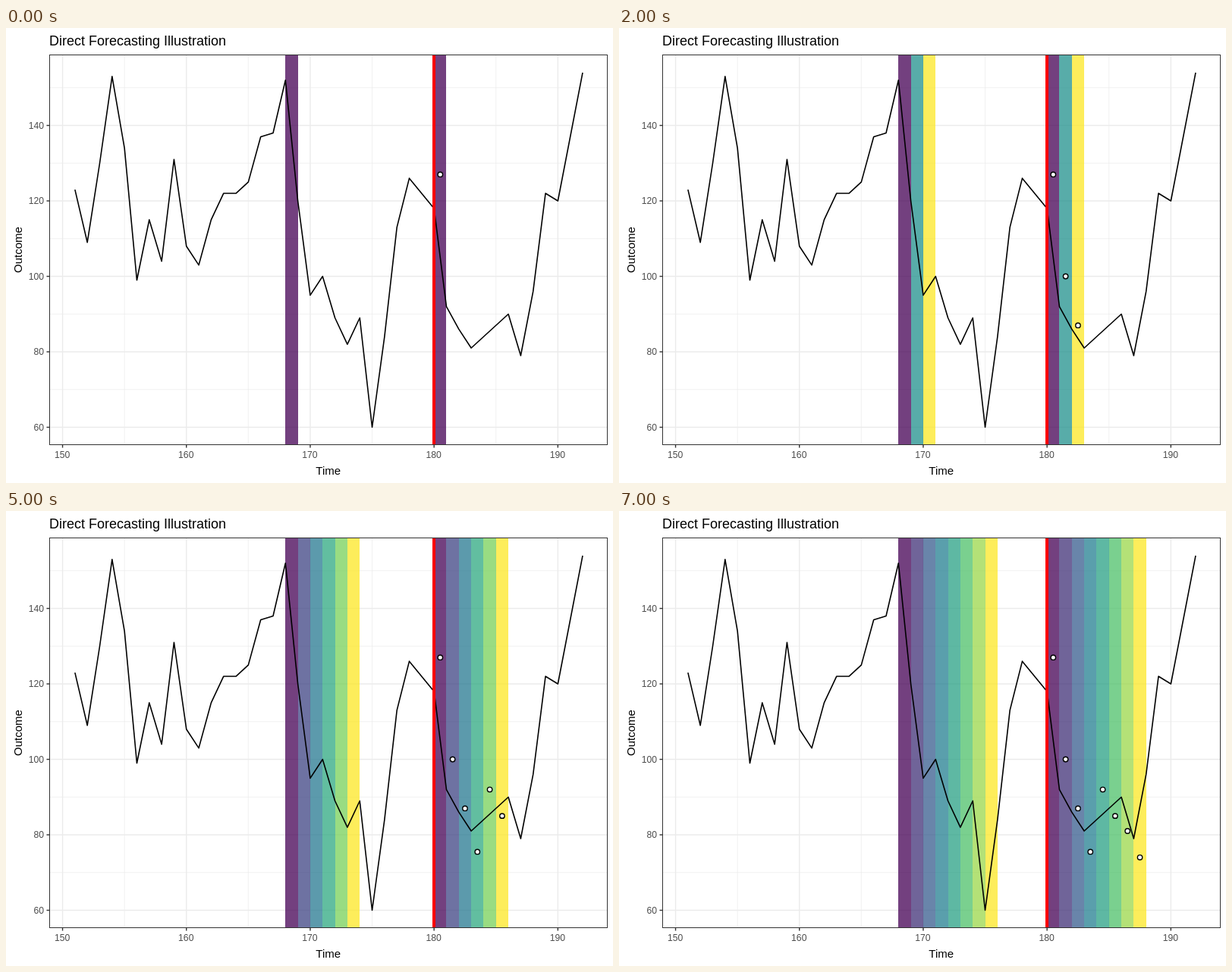
An HTML page for the animation above (8 s loop, 800 px wide and 600 px high).

```html
<!DOCTYPE html>
<html lang="en">
<head>
<meta charset="utf-8">
<title>Direct Forecasting Illustration</title>
<style>
html, body { margin: 0; width: 100%; height: 100%; overflow: hidden; background: #fff; }
svg { display: block; width: 800px; height: 600px; font-family: "Liberation Sans", Arial, sans-serif; }
#grid { stroke: #ebebeb; }
#ticks { stroke: #333; stroke-width: 1.42; }
#labels { fill: #4d4d4d; font-size: 12.2px; }
#series { fill: none; stroke: #000; stroke-width: 1.6; stroke-linejoin: round; }
#points { fill: #fff; stroke: #000; stroke-width: 1.4; }
.axis { font-size: 15px; text-anchor: middle; }
</style>
</head>
<body>
<svg viewBox="0 0 800 600">
  <g id="grid"></g>
  <g id="bands" fill-opacity=".75" shape-rendering="crispEdges"></g>
  <path id="series"/>
  <rect x="562" y="36" width="4" height="513" fill="#f00"/>
  <g id="points"></g>
  <rect x="57.5" y="35.5" width="735" height="514" fill="none" stroke="#333"/>
  <g id="ticks"></g>
  <g id="labels"></g>
  <text x="57" y="23" font-size="18">Direct Forecasting Illustration</text>
  <text class="axis" x="424.7" y="589">Time</text>
  <text class="axis" transform="translate(21 292.5) rotate(-90)">Outcome</text>
</svg>
<script>
const LEFT = 57.5, RIGHT = 792.5, TOP = 35.5, BOTTOM = 549.5;
const STEP = 1000, COUNT = 8, START = 151;

// Turning points per time unit; gaps are straight runs
const outcome = [
  123, 109, 130, 153, 134, 99, 115, 104, 131, 108, 103, 115, 122, 122,
  125, 137, 138, 152, 120, 95, 100, 89, 82, 89, 60, 84, 113, 126,
  , 118, 92, 86, 81, , , 90, 79, 96, 122, 120, , 154
];
const forecast = [127, 100, 87, 75.5, 92, 85, 81, 74];
const viridis = [0x440154, 0x3b528b, 0x21908c, 0x5dc863, 0xfde725];

const $ = id => document.getElementById(id);
const px = t => 74.55 + (t - 150) * 16.32;
const py = v => 128.5 + (140 - v) * 4.975;

function add(parent, tag, attrs, text = "") {
  const el = document.createElementNS("http://www.w3.org/2000/svg", tag);
  for (const k in attrs) el.setAttribute(k, attrs[k]);
  el.textContent = text;
  return $(parent).appendChild(el);
}

function line(parent, x1, y1, x2, y2, width) {
  const el = add(parent, "line", { x1, y1, x2, y2 });
  if (width) el.setAttribute("stroke-width", width);
}

// Smooth curve through the key colours, extended straight at both ends
function palette(u) {
  const last = viridis.length - 1;
  const i = Math.min(Math.floor(u * last), last - 1);
  const f = u * last - i;
  const rgb = [16, 8, 0].map(shift => {
    const at = k => viridis[k] >> shift & 255;
    const b = at(i), c = at(i + 1);
    const a = i > 0 ? at(i - 1) : 2 * b - c;
    const d = i + 2 <= last ? at(i + 2) : 2 * c - b;
    return Math.round(b + f / 2 * (c - a + f * (2 * a - 5 * b + 4 * c - d + f * (3 * (b - c) + d - a))));
  });
  return `rgb(${rgb})`;
}

function gridX(t, width) { line("grid", px(t), TOP, px(t), BOTTOM, width); }
function gridY(v, width) { line("grid", LEFT, py(v), RIGHT, py(v), width); }

for (let t = 155; t <= 185; t += 10) gridX(t, 0.71);
for (let v = 70; v <= 150; v += 20) gridY(v, 0.71);
for (let t = 150; t <= 190; t += 10) {
  gridX(t, 1.42);
  line("ticks", px(t), BOTTOM, px(t), BOTTOM + 4);
  add("labels", "text", { x: px(t) - 0.5, y: 567, "text-anchor": "middle" }, t);
}
for (let v = 60; v <= 140; v += 20) {
  gridY(v, 1.42);
  line("ticks", LEFT - 4, py(v), LEFT, py(v));
  add("labels", "text", { x: 50, y: py(v) + 4.4, "text-anchor": "end" }, v);
}

const path = [];
outcome.forEach((v, i) => path.push(`${px(START + i)} ${py(v)}`));
$("series").setAttribute("d", "M" + path.join("L"));

function addBand(t) {
  const x = Math.round(px(t));
  return add("bands", "rect", { x, y: 36, width: Math.round(px(t + 1)) - x, height: 513 });
}

const steps = forecast.map((v, i) => ({
  bands: [addBand(168 + i), addBand(180 + i)],
  point: add("points", "circle", { cx: px(180.5 + i), cy: py(v), r: 3.2 })
}));

let shown = 0;
function show(n) {
  if (n === shown) return;
  shown = n;
  steps.forEach(({ bands, point }, i) => {
    const display = i < n ? "inline" : "none";
    point.style.display = display;
    for (const band of bands) {
      band.style.display = display;
      if (i < n) band.setAttribute("fill", palette(n > 1 ? i / (n - 1) : 0));
    }
  });
}

const start = performance.now();
function tick() {
  show(Math.floor((performance.now() - start) / STEP) % COUNT + 1);
  requestAnimationFrame(tick);
}
tick();
</script>
</body>
</html>
```
